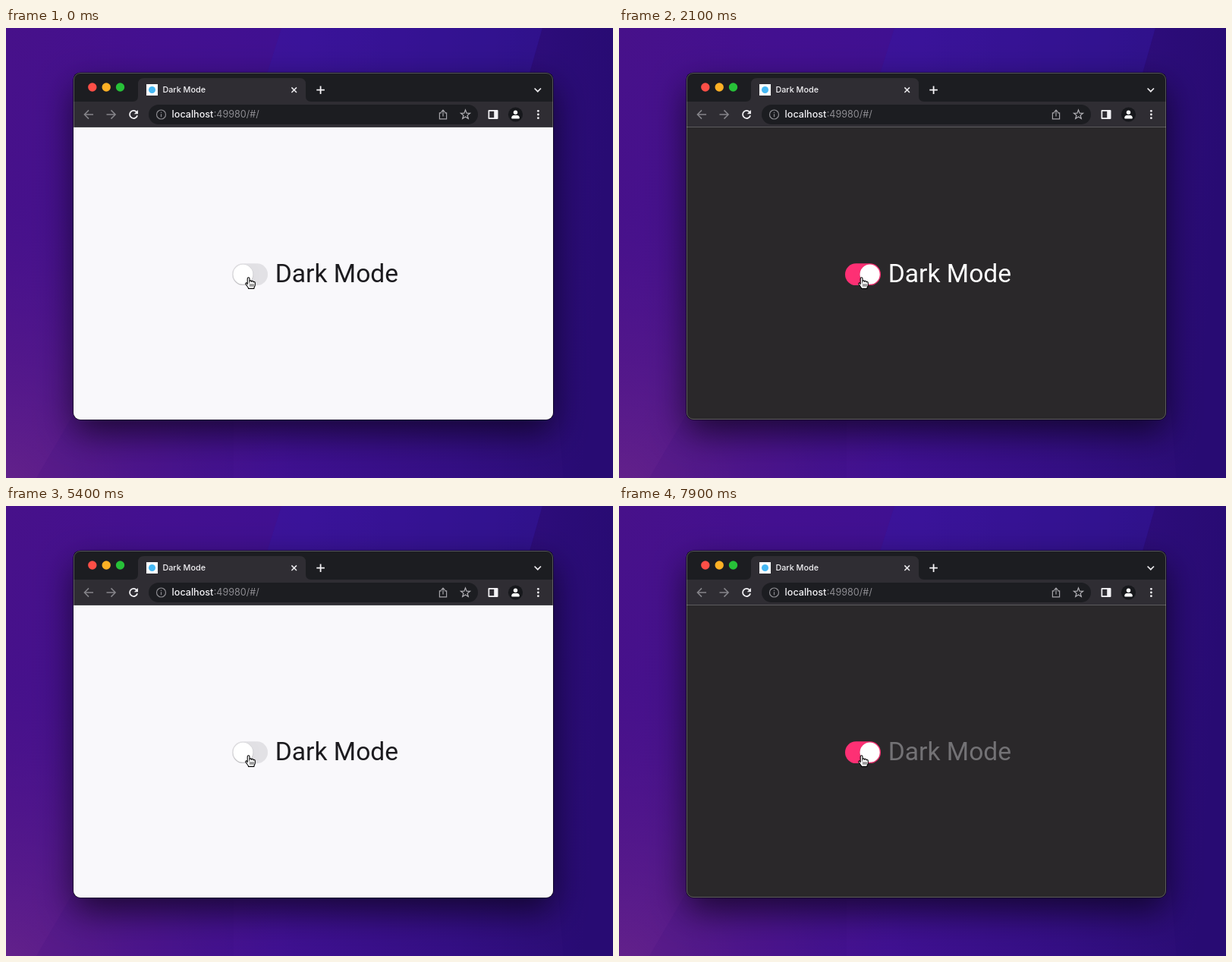
Write an HTML page with a canvas that moves like this. It is 800 by 593 pixels and loops after 8 s.

```html
<!DOCTYPE html>
<html lang="en">
<head>
<meta charset="utf-8">
<title>Dark Mode</title>
<style>
  html, body { margin: 0; width: 100%; height: 100%; overflow: hidden; background: #3d1085; }
  canvas { display: block; }
</style>
</head>
<body>
<canvas id="stage" width="800" height="593"></canvas>
<script>
const ctx = document.getElementById('stage').getContext('2d');
const LOOP = 8000, STEP = 100, FADE = 200;
const WIN = { x: 89, y: 59, w: 632, h: 457, r: 9 };
const BAR = '#1c1d21', TOOLBAR = '#2f2d33', GREY = '#8d8c91';
const LIGHT = [249, 248, 251], DARK = [42, 40, 42];
const INK = [28, 27, 31], PAPER = [255, 255, 255];

// lead: how far the label colour drifts while the theme itself is fading
const TOGGLES = [
  { at: 694, dark: true, lead: 0.02 },
  { at: 4006, dark: false, lead: 0.22 },
  { at: 7626, dark: true, lead: 0.02 }
];

const clamp = v => Math.max(0, Math.min(1, v));
const mix = (a, b, p) => a + (b - a) * p;
const mixRgb = (a, b, p) => `rgb(${a.map((v, i) => Math.round(mix(v, b[i], p)))})`;

// cubic-bezier(.25, .1, .25, 1)
function ease(x) {
  const curve = (a, b, u) => 3 * a * u * (1 - u) ** 2 + 3 * b * u * u * (1 - u) + u ** 3;
  let lo = 0, hi = 1;
  for (let i = 0; i < 24; i++) {
    const mid = (lo + hi) / 2;
    if (curve(0.25, 0.25, mid) < x) lo = mid; else hi = mid;
  }
  return curve(0.1, 1, lo);
}

function stateAt(t) {
  const state = { theme: 0, knob: 0, label: 0 };
  for (const { at, dark, lead } of TOGGLES) {
    if (t < at) break;
    const p = clamp((t - at) / FADE), q = clamp((t - at - FADE) / FADE);
    const toward = v => dark ? v : 1 - v;
    state.theme = toward(p);
    state.knob = toward(ease(p));
    state.label = toward(lead * p + (1 - lead) * q);
  }
  return state;
}

function box(x, y, w, h, r, fill) {
  ctx.beginPath();
  ctx.roundRect(x, y, w, h, r);
  if (fill) { ctx.fillStyle = fill; ctx.fill(); }
}

function disc(x, y, r, fill) {
  ctx.beginPath();
  ctx.arc(x, y, r, 0, 7);
  ctx.fillStyle = fill;
  ctx.fill();
}

function poly(points, fill) {
  ctx.beginPath();
  points.forEach(([x, y]) => ctx.lineTo(x, y));
  ctx.closePath();
  ctx.fillStyle = fill;
  ctx.fill();
}

function stroke(d, color, width, x = 0, y = 0) {
  ctx.save();
  ctx.translate(x, y);
  ctx.strokeStyle = color;
  ctx.lineWidth = width;
  ctx.stroke(new Path2D(d));
  ctx.restore();
}

function text(str, x, y, font, fill) {
  ctx.font = font;
  ctx.fillStyle = fill;
  ctx.fillText(str, x, y);
}

function shadow(color, blur, dy) {
  ctx.shadowColor = color;
  ctx.shadowBlur = blur;
  ctx.shadowOffsetY = dy;
}

function fillStops(gradient, stops) {
  stops.forEach(([at, color]) => gradient.addColorStop(at, color));
  ctx.fillStyle = gradient;
  ctx.fillRect(0, 0, 800, 593);
}

function wallpaper() {
  fillStops(ctx.createLinearGradient(0, 0, 800, 60), [
    [0, '#47118a'], [0.25, '#431090'], [0.5, '#3f1091'], [0.8, '#330e83'], [1, '#2a0c74']
  ]);
  poly([[363, 0], [707, 0], [690, 60], [344, 60]], 'rgba(48,26,168,0.32)');
  poly([[707, 0], [800, 0], [800, 593], [735, 593], [690, 60]], 'rgba(38,10,112,0.3)');
  fillStops(ctx.createRadialGradient(0, 610, 10, 0, 610, 380), [
    [0, 'rgba(104,36,138,0.85)'], [0.5, 'rgba(92,28,138,0.45)'], [1, 'rgba(80,20,140,0)']
  ]);
  poly([[40, 593], [100, 490], [300, 490], [300, 593]], 'rgba(50,14,125,0.12)');
}

function tabStrip() {
  disc(113.8, 78, 5.7, '#fd4f47');
  disc(132.2, 78, 5.7, '#fdb125');
  disc(150.5, 78, 5.7, '#27c138');

  ctx.fillStyle = TOOLBAR;
  ctx.fill(new Path2D('M167 97q7 0 7-7V74q0-8 8-8H387q8 0 8 8V90q0 7 7 7z'));
  ctx.fillStyle = '#fff';
  ctx.fillRect(185, 74, 15, 15);
  disc(192.5, 81.5, 4.5, '#45b8f4');
  text('Dark Mode', 206.4, 85.4, '500 10.8px Inter, sans-serif', '#f4f3f6');

  stroke('M-3.3-3.3L3.3 3.3M3.3-3.3L-3.3 3.3', '#e8e7ea', 1.5, 379.7, 81.7);
  stroke('M-5.3 0H5.3M0-5.3V5.3', '#f4f3f6', 1.8, 414.6, 81.7);
  stroke('M-4.2-2L0 2.2L4.2-2', '#e8e7ea', 1.7, 700.8, 81.5);
}

function toolbar() {
  ctx.fillStyle = TOOLBAR;
  ctx.fillRect(WIN.x, 97, WIN.w, 34);

  const arrow = 'M6 0H-5.4M0-5.6L-5.6 0L0 5.6';
  stroke(arrow, '#858489', 1.5, 109, 114);
  stroke('M-6 0H5.4M0-5.6L5.6 0L0 5.6', '#858489', 1.5, 138.5, 114);
  stroke('M4.6-2.6A5.1 5.1 0 1 0 5.1 1.2', '#f0eff2', 1.8, 168, 114);
  poly([[174, 108], [174, 113.2], [168.8, 113.2]], '#f0eff2');

  box(188, 101, 434, 26, 13, BAR);
  stroke('M6 0A6 6 0 1 1-6 0A6 6 0 1 1 6 0M0-.8V3.3M0-3.3V-1.9', GREY, 1.2, 204.5, 114);
  const urlFont = '12.6px Inter, sans-serif';
  text('localhost', 218.6, 118.4, '500 ' + urlFont, '#f4f3f6');
  text(':49980/#/', 273.7, 118.4, urlFont, GREY);

  stroke('M-2-2.2H-4.6V5.8H4.6V-2.2H2M0 2.4V-5.4M-2.6-3.2L0-5.8L2.6-3.2', '#a5a4a9', 1.2, 576, 114);

  let star = '';
  for (let i = 0; i < 10; i++) {
    const a = i * Math.PI / 5 - Math.PI / 2, r = i % 2 ? 2.7 : 6.4;
    star += `${i ? 'L' : 'M'}${r * Math.cos(a)} ${r * Math.sin(a)}`;
  }
  stroke(star + 'z', '#b3b2b7', 1.2, 605.5, 114.3);

  box(635.5, 108, 13, 12, 1, '#f4f3f6');
  ctx.fillStyle = TOOLBAR;
  ctx.fillRect(637.2, 109.8, 6, 8.4);

  disc(671.5, 114, 9.6, '#17181c');
  disc(671.5, 111.2, 2.7, '#fff');
  box(666.2, 115, 10.6, 4.4, [4, 4, 1, 1], '#fff');

  for (const y of [109.3, 114, 118.7]) disc(701.4, y, 1.4, '#f0eff2');
}

function toggle(knob) {
  const rgb = [mix(120, 254, knob), mix(120, 48, knob), mix(128, 116, knob)].map(Math.round);
  ctx.save();
  box(298, 310.3, 47, 28.8, 14.4, `rgba(${rgb},${mix(0.18, 1, knob)})`);
  ctx.clip();
  const x = mix(312.4, 330.6, knob), y = 324.7;
  shadow('rgba(0,0,0,0.2)', 7, 2.6);
  disc(x, y, 13.4, 'rgba(0,0,0,0.12)');
  shadow('rgba(0,0,0,0.1)', 1, 1.5);
  disc(x, y, 13.1, '#fff');
  ctx.restore();
}

function hand() {
  const shape = new Path2D(
    'M318.2 338.3V330.2C318.2 328.3 321 328.3 321 330.2V333.6' +
    'C321.3 332.5 323.4 332.6 323.6 334C324.2 333 326 333.3 326.1 334.7' +
    'C326.8 333.9 328.4 334.4 328.3 336V338.6C328.3 340.4 327 341.2 326.8 343.4' +
    'H319.6C319.4 341.4 317.4 340 316.1 337.8C315.2 336 316.9 335.2 318.2 336.8z');
  ctx.fillStyle = '#fff';
  ctx.fill(shape);
  ctx.strokeStyle = '#000';
  ctx.lineWidth = 1.1;
  ctx.stroke(shape);
  stroke('M321.9 337.2V340.8M323.9 337.2V340.8M325.9 337.2V340.8', '#000', 0.8);
}

function draw(t) {
  const { theme, knob, label } = stateAt(t);
  const { x, y, w, h, r } = WIN;
  wallpaper();

  ctx.save();
  shadow('rgba(0,0,0,0.62)', 46, 18);
  box(x, y, w, h, r, '#000');
  ctx.restore();
  box(x - 0.6, y - 0.6, w + 1.2, h + 1.2, r + 0.6, '#0a0610');

  ctx.save();
  box(x, y, w, h, r, BAR);
  ctx.clip();
  tabStrip();
  toolbar();
  ctx.fillStyle = mixRgb(LIGHT, DARK, theme);
  ctx.fillRect(x, 131, w, h);
  ctx.fillStyle = mixRgb([70, 69, 73], [92, 91, 94], theme);
  ctx.fillRect(x, 130, w, 1);
  ctx.restore();

  box(x + 0.5, y + 0.5, w - 1, h - 1, r - 0.5);
  ctx.strokeStyle = 'rgba(255,255,255,0.24)';
  ctx.lineWidth = 1;
  ctx.stroke();

  toggle(knob);
  text('Dark Mode', 354.8, 335.4, '33.6px Roboto, sans-serif', mixRgb(INK, PAPER, label));
  hand();
}

let shown = -1;
const start = performance.now();
function tick() {
  const t = Math.floor(Math.max(0, performance.now() - start) % LOOP / STEP) * STEP;
  if (t !== shown) draw(shown = t);
  requestAnimationFrame(tick);
}
tick();
</script>
</body>
</html>
```
